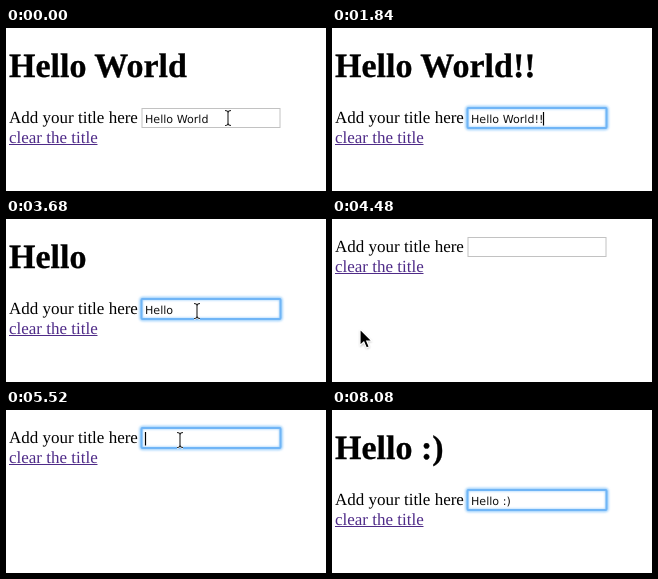
An HTML page for the animation above (8240 ms loop, 320 px wide and 163 px high).

```html
<!DOCTYPE html>
<html lang="en">
<head>
<meta charset="utf-8">
<title>Title editor</title>
<style>
html, body { margin: 0; width: 100%; height: 100%; overflow: hidden; background: #fff; }
svg { display: block; width: 100vw; height: 100vh; }
text { text-rendering: geometricPrecision; }
.serif { font: 17px "Liberation Serif", serif; }
#heading { font: bold 34px "Liberation Serif", serif; stroke: #000; stroke-width: .3; }
#value { font: 11.1px "DejaVu Sans", sans-serif; white-space: pre; }
</style>
</head>
<body>
<svg viewBox="0 0 320 163">
  <defs>
    <filter id="soft" x="-10%" y="-40%" width="120%" height="180%"><feGaussianBlur stdDeviation=".8"/></filter>
    <path id="bar" d="M-3-7.5Q0-7.5 0-5Q0-7.5 3-7.5M0-5.5V5.5M-3 7.5Q0 7.5 0 5Q0 7.5 3 7.5"/>
  </defs>
  <text id="heading" x="3" y="49"></text>
  <g id="form">
    <text class="serif" x="3" y="95">Add your title here</text>
    <text class="serif" x="3" y="115" fill="#4f2b88">clear the title</text>
    <path d="M3 116.5H91.5" stroke="#4f2b88"/>
    <rect id="box" x="136" y="80.5" width="138" height="19" fill="#fff" stroke="#c2c2c2"/>
    <g id="ring" fill="none">
      <rect x="135" y="79.5" width="140" height="21" rx="2" stroke="#9fd0fb" stroke-width="3.5" filter="url(#soft)"/>
      <rect x="135.5" y="80" width="139" height="20" rx="1" stroke="#70b5f6" stroke-width="2"/>
    </g>
    <text id="value" x="139" y="95" fill="#111"></text>
    <path id="caret" d="M.5 84V97.5" stroke="#000" stroke-width="1.2"/>
  </g>
  <g id="mouse">
    <g id="beam" fill="none">
      <use href="#bar" stroke="#fff" stroke-width="2.6"/>
      <use href="#bar" stroke="#222" stroke-width="1.1"/>
    </g>
    <g id="arrow">
      <path d="M0 1V18L4 14.5L6.7 20L9.7 18.7L7.2 13H12.3Z" opacity=".3" filter="url(#soft)"/>
      <path d="M0 0V16.5L3.8 13L6.4 19L9.3 17.7L6.8 12H12Z" stroke="#fff" stroke-width="1.2"/>
    </g>
    <path id="hand" d="M-1.5 1Q0-1 1.5 1V7Q3 5 4.3 7Q6 5.5 7 7.5Q9 6.5 9.5 9V13L7.5 18H0L-5 11Q-5.5 8-3 9L-1.5 11Z" fill="#fff" stroke="#111"/>
  </g>
</svg>
<script>
const LOOP = 8240, STEP = 80, BLINK = 440, LIFT = -62;
const FOCUS = 480, BLUR = 4480, REFOCUS = 5360;
const $ = id => document.getElementById(id);
const show = (id, on) => $(id).style.display = on ? "" : "none";

// Each edit turns the title into a new one, a letter per gap
const edits = [{ at: -LOOP, text: "Hello World" }];
function edit(at, gap, goal) {
  let text = edits.at(-1).text;
  for (; text !== goal; at += gap) {
    const n = text.length;
    text = !gap ? goal : n > goal.length ? text.slice(0, -1) : goal.slice(0, n + 1);
    edits.push({ at, text });
  }
}
edit(1360, 320, "Hello World!!");
edit(2080, 160, "Hello ");
edit(BLUR, 0, "");
edit(6000, 144, "Hello ");
edit(7200, 320, "Hello :)");

// Pointer moves: start, end, and where it stops
const moves = [
  { at: 0, end: 320, x: 226, y: 92 },
  { at: 1350, end: 3360, x: 191, y: 92 },
  { at: 3680, end: 4240, x: 28, y: 110 },
  { at: BLUR, end: 4720, x: 72, y: 112 },
  { at: 4960, end: 5200, x: 174, y: 30 }
];

const last = (list, t) => list.findLast(k => k.at <= t);

function pointer(t) {
  const move = last(moves, t);
  const from = moves[moves.indexOf(move) - 1] || { x: 222, y: 90 };
  const u = Math.min(1, (t - move.at) / (move.end - move.at));
  const ease = u * u * (3 - 2 * u), dx = move.x - from.x;
  const sag = Math.abs(dx) * .12 * Math.sin(Math.PI * u);
  return [from.x + dx * ease, from.y + (move.y - from.y) * ease + sag];
}

function shape(x, y) {
  if (x > 135 && x < 275 && y > 78 && y < 103) return "beam";
  return x < 92 && y > 100 && y < 120 ? "hand" : "arrow";
}

function draw(ms) {
  const t = Math.floor(ms % LOOP / STEP) * STEP;
  const { at, text } = last(edits, t);
  const lift = text ? 0 : LIFT;
  $("heading").textContent = $("value").textContent = text;
  $("form").setAttribute("transform", `translate(0 ${lift})`);

  const focused = t >= REFOCUS || t >= FOCUS && t < BLUR;
  const active = Math.max(at, t >= REFOCUS ? REFOCUS : FOCUS);
  show("ring", focused);
  show("box", !focused);
  show("caret", focused && Math.floor((t - active) / BLINK) % 2 === 0);
  const width = text ? $("value").getComputedTextLength() : 0;
  $("caret").setAttribute("transform", `translate(${Math.round(139 + width)} 0)`);

  // Typing hides the pointer until it moves again
  const [x, y] = pointer(t);
  const kind = last(moves, t).at >= at && shape(x, y - lift);
  $("mouse").setAttribute("transform", `translate(${x} ${y})`);
  for (const id of ["beam", "arrow", "hand"]) show(id, id === kind);
}

let start;
function tick(now) {
  start ??= now;
  draw(now - start);
  requestAnimationFrame(tick);
}
draw(0);
requestAnimationFrame(tick);
</script>
</body>
</html>
```
